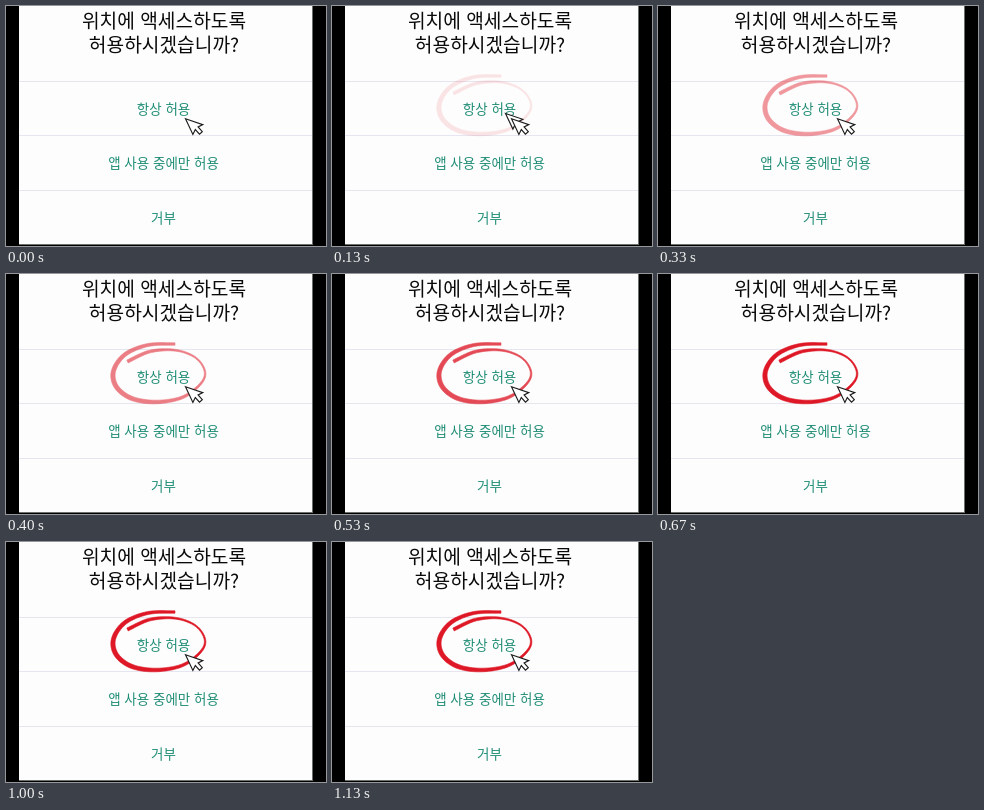
Recreate the animation shown at these times as an HTML page. Size 320 by 240 pixels, loop 1.19 s.

```html
<!DOCTYPE html>
<html lang="ko">
<head>
<meta charset="utf-8">
<title>위치 권한</title>
<style>
  html, body { margin: 0; width: 100%; height: 100%; overflow: hidden; background: #000; }
  svg { display: block; width: 100%; height: 100%; }
  text { font-family: "Noto Sans CJK KR", "Noto Sans CJK", "Noto Sans KR", sans-serif; text-anchor: middle; }
  .title { font-size: 19.2px; fill: #0a0a0a; }
  .option { font-size: 13.5px; fill: #1f8d75; }
  .rule { stroke: #e6e6f0; stroke-width: 1; }
  .cursor { fill: #fff; stroke: #1c1c1c; stroke-width: 1.15; stroke-linejoin: miter; }
</style>
</head>
<body>
<svg viewBox="0 0 320 240">
  <defs>
    <path id="arrow" class="cursor" d="M0 0 L17.3 5.8 L12.6 8.2 L16.8 12.8 L14 15.3 L9.8 10.8 L7.4 15.6 Z"/>
  </defs>
  <rect width="320" height="240" fill="#000"/>
  <rect x="13" y="0" width="294" height="239" fill="#6c706c"/>
  <rect x="13" y="0" width="293" height="238" fill="#fdfdfd"/>
  <path class="rule" d="M13 75.5H306M13 129.5H306M13 184.5H306"/>
  <text class="title" x="158" y="22.2">위치에 액세스하도록</text>
  <text class="title" x="158" y="46.3">허용하시겠습니까?</text>
  <text class="option" x="157.5" y="108.3">항상 허용</text>
  <text class="option" x="157.5" y="162.3">앱 사용 중에만 허용</text>
  <text class="option" x="157.5" y="216.5">거부</text>
  <path id="ring" fill="#de1826" stroke="#de1826" stroke-width=".6" stroke-linejoin="round"/>
  <use id="press" href="#arrow" x="173.5" y="107.5"/>
  <use href="#arrow" x="179.5" y="112.8"/>
</svg>
<script>
const LOOP = 1190;
const ring = document.getElementById('ring');
const press = document.getElementById('press');

// Brush stroke: x, y, width along the hand-drawn loop
const brush = [
  [169, 70, 2.4], [142, 71, 3], [119, 80.5, 3.8], [107.5, 97, 4.2], [110.5, 113, 4.4],
  [126, 124.5, 4.2], [150, 128, 3.6], [176, 123.5, 2.8], [194, 110.5, 2], [199, 98, 1.5],
  [190, 84, 1.5], [170, 76.3, 1.8], [144, 77.5, 2.8], [121.5, 87.5, 3.2]
];

function spline(a, b, c, d, u) {
  return b + u / 2 * (c - a + u * (2 * a - 5 * b + 4 * c - d + u * (3 * (b - c) + d - a)));
}

function sample(s) {
  const last = brush.length - 1;
  const i = Math.min(Math.floor(s), last - 1);
  const at = j => brush[Math.max(0, Math.min(last, j))];
  return [0, 1, 2].map(n => spline(at(i - 1)[n], at(i)[n], at(i + 1)[n], at(i + 2)[n], s - i));
}

function ribbon() {
  const left = [], right = [], end = brush.length - 1, steps = end * 8;
  for (let k = 0; k <= steps; k++) {
    const s = k / 8;
    const [x, y, w] = sample(s);
    const a = sample(Math.max(0, s - .05)), b = sample(Math.min(end, s + .05));
    const angle = Math.atan2(b[1] - a[1], b[0] - a[0]);
    const nx = -Math.sin(angle) * w / 2, ny = Math.cos(angle) * w / 2;
    left.push([x + nx, y + ny]);
    right.unshift([x - nx, y - ny]);
  }
  return 'M' + left.concat(right).map(p => p.map(v => v.toFixed(2)).join(' ')).join('L') + 'Z';
}

// Picture steps at 15 per second
function draw(ms) {
  const step = Math.floor((ms % LOOP) * .015 + .05);
  ring.setAttribute('opacity', Math.max(0, Math.min(1, (step - 1) / 9)));
  press.setAttribute('visibility', step === 2 || step === 3 ? 'visible' : 'hidden');
}

ring.setAttribute('d', ribbon());
const start = performance.now();
function tick() {
  draw(performance.now() - start);
  requestAnimationFrame(tick);
}
tick();
</script>
</body>
</html>
```
